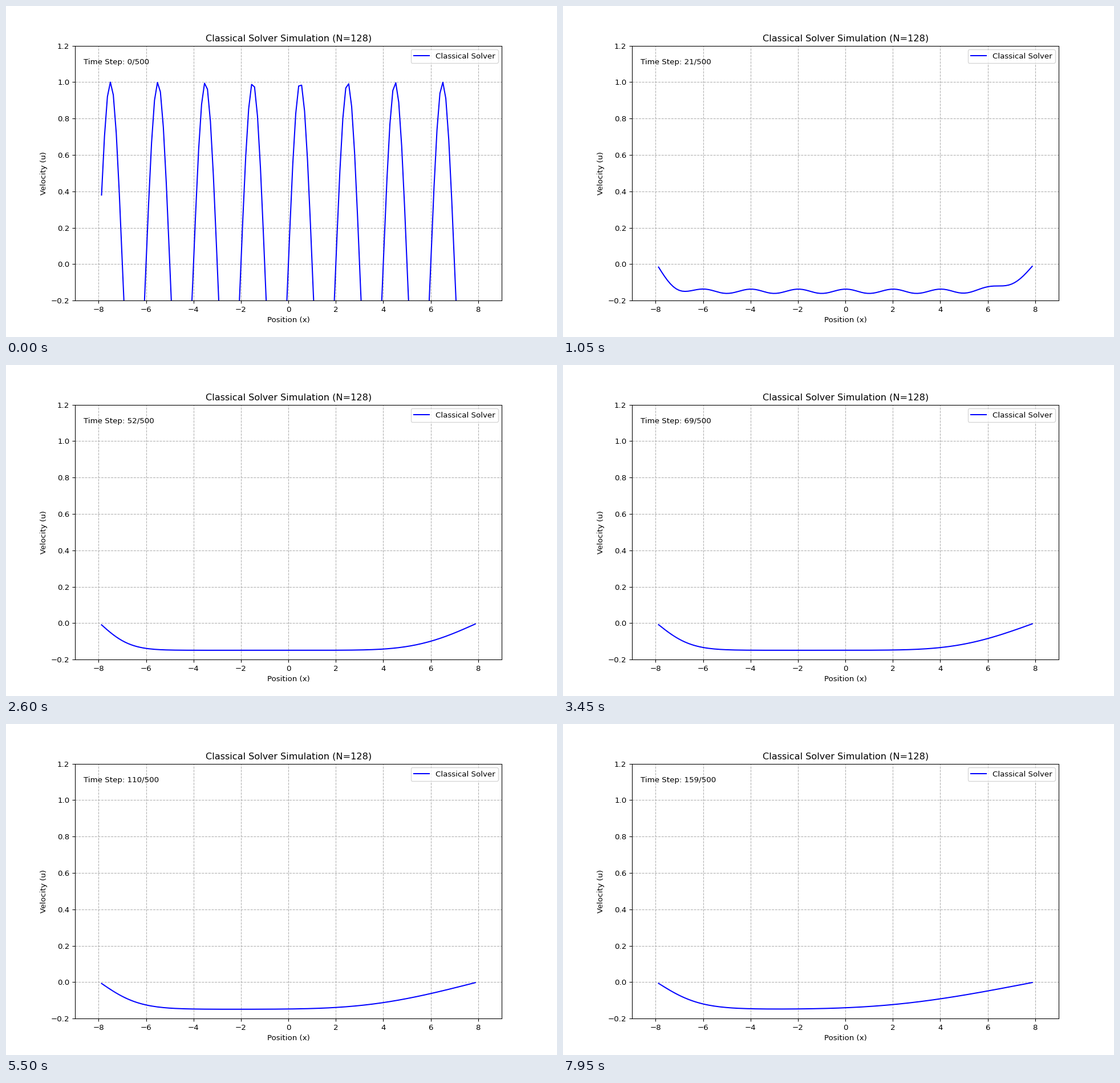
Write a matplotlib script that moves like this. It is 966 px wide and 580 px high and loops after 8 s.

```python
import numpy as np
import matplotlib.pyplot as plt
from matplotlib.animation import FuncAnimation

N = 128
STEPS = 160
TOTAL = 500
NU = 0.01
DT = 0.01

# The equation is solved on the unit interval and shown on [-8, 8].
dx = 1 / (N + 1)
x = 16 * (dx * np.arange(1, N + 1) - 0.5)

r = NU * DT / dx**2
implicit = (1 + 2 * r) * np.eye(N) - r * (np.eye(N, k=1) + np.eye(N, k=-1))
diffuse = np.linalg.inv(implicit)


def advance(u):
    """Explicit backward advection, then implicit diffusion."""
    moved = np.zeros(N)
    moved[1:-1] = u[1:-1] - DT / dx * u[1:-1] * (u[1:-1] - u[:-2])
    return diffuse @ moved


history = [np.sin(np.pi * x)]
while len(history) < STEPS:
    history.append(advance(history[-1]))

DPI = 96.6
fig, ax = plt.subplots(figsize=(966 / DPI, 580 / DPI), dpi=DPI)
line, = ax.plot(x, history[0], "b-", label="Classical Solver")
ax.set_xlim(-9, 9)
ax.set_ylim(-0.2, 1.2)
ax.set_title(f"Classical Solver Simulation (N={N})")
ax.set_xlabel("Position (x)")
ax.set_ylabel("Velocity (u)")
ax.grid(True, linestyle="--")
ax.legend(loc="upper right")
label = ax.text(0.02, 0.95, "", transform=ax.transAxes, va="top")


def update(step):
    line.set_ydata(history[step])
    label.set_text(f"Time Step: {step}/{TOTAL}")
    return line, label


anim = FuncAnimation(fig, update, frames=STEPS, interval=50, repeat=True)
plt.show()
```
